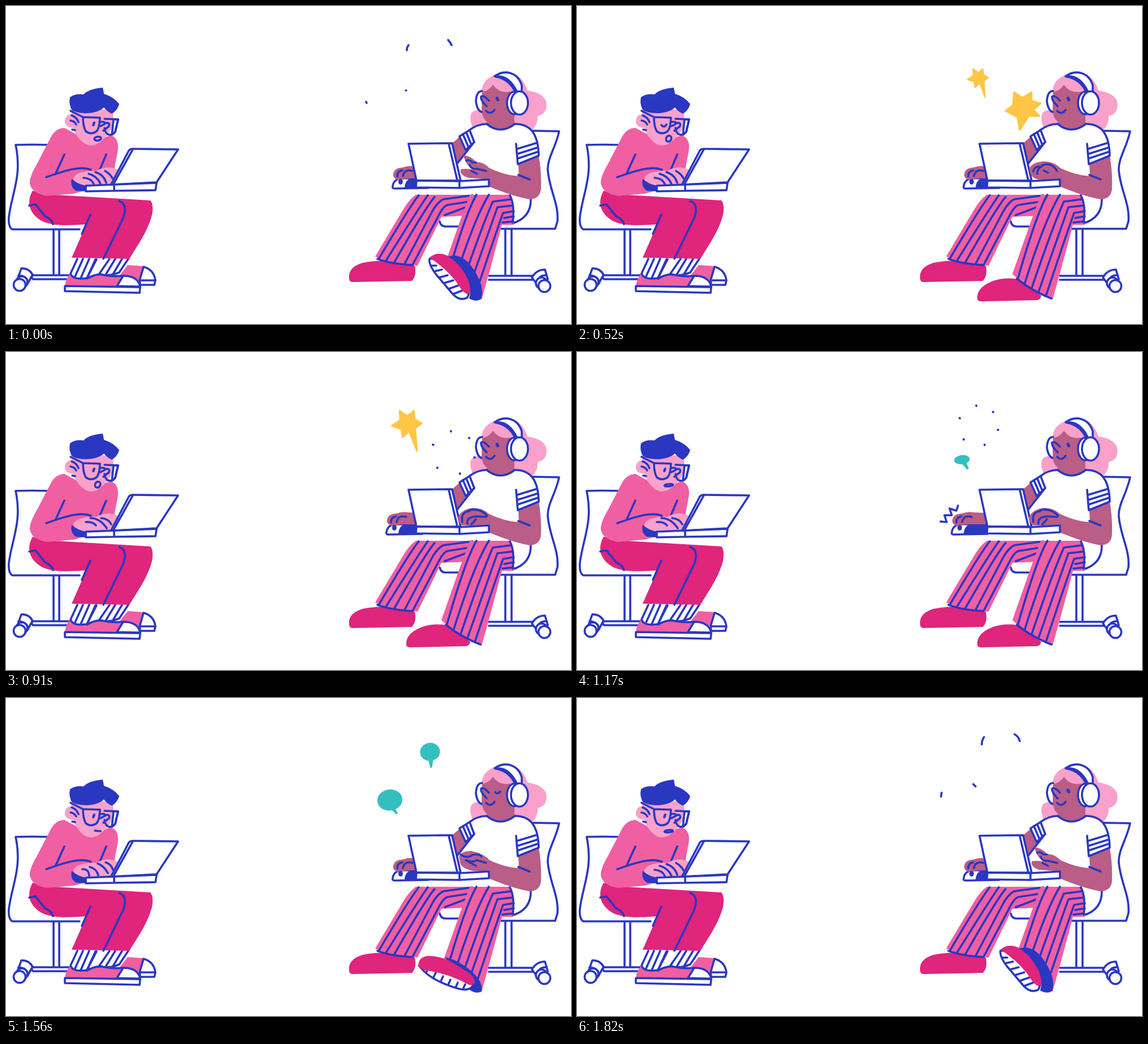
These frames come from a looping animation (998 px wide and 561 px high, 1.95 s). An HTML page:

```html
<!DOCTYPE html>
<html lang="en">
<head>
<meta charset="utf-8">
<title>Two people at laptops</title>
<style>
html, body { margin: 0; width: 100%; height: 100%; overflow: hidden; background: #fff; }
svg { display: block; width: 100%; height: 100%; stroke-linecap: round; stroke-linejoin: round; }
.line, .white { stroke: #2a37c1; stroke-width: 3.6; }
.line { fill: none; }
.white { fill: #fff; }
.blue { fill: #2a37c1; }
.pink { fill: #f05fa2; }
.pale { fill: #f9a1ca; }
.hot { fill: #df257c; }
.brown { fill: #ba5d87; }
.gold { fill: #ffc544; stroke: #ffc544; stroke-width: 3; }
.teal { fill: #34bfbe; }
</style>
</head>
<body>
<svg viewBox="0 0 998 561">
  <!-- left chair -->
  <path class="line" d="M75 245Q45 244 17 245C29 300 10 330 5 373Q4 390 11 394H130M84 395V473M94 395V473M113 475H48Q43 478 48 482H113"/>
  <path class="white" d="M20 483L27 463Q40 462 47 474L38 490Z"/>
  <path class="line" d="M22 475Q38 476 39 489"/>
  <circle class="white" cx="28" cy="487" r="10"/>
  <circle class="white" cx="24" cy="492" r="10.5"/>

  <!-- left legs and shoes -->
  <path class="pink" d="M200 476L215 457L243 459L237 484Z"/>
  <path class="white" d="M236 484L243 460Q261 465 264 484Z M236 484H264L262 492H237Z"/>
  <path class="white" d="M183 446L165 472Q178 479 200 470L216 446"/>
  <path class="line" d="M193 446L176 474M205 446L189 473"/>
  <path class="pink" d="M104 494Q106 479 114 472L145 481L165 473L208 476L198 495Z"/>
  <path class="white" d="M196 494L207 476Q233 476 237 495Z"/>
  <path class="white" d="M126 446L114 472Q118 484 143 480L160 447"/>
  <path class="line" d="M136 446L122 477M147 446L132 480M158 447L143 480M143 481Q158 472 170 474Q188 478 207 476"/>
  <path class="white" d="M104 494L237 496L236 506L104 503Z"/>
  <path class="hot" d="M47 326L85 333L255 343Q261 350 258 368C250 399 232 422 218 446L116 444L142 385C106 388 78 388 61 378C40 364 36 345 47 326Z"/>
  <path class="line" d="M41 352L52 350L69 371Q81 376 83 385M149 368L134 402M200 344C212 348 212 360 207 374L172 446"/>

  <!-- left body -->
  <path class="pink" d="M103 215Q88 216 80 230L54 280Q42 300 42 312Q44 330 72 335L120 331L195 310C186 290 198 265 198 247Q197 232 185 228L150 240Z"/>
  <path class="line" d="M103 262L88 295M71 302C95 294 130 280 150 289M177 262L166 288"/>
  <path class="pale" d="M114 180L189 183L190 207Q186 222 172 235Q152 255 134 239Q123 229 119 215Q104 214 104 203Q105 191 116 191Z"/>
  <path class="blue" d="M113 161Q123 154 137 156C144 148 158 145 171 144L173 155Q190 160 200 173Q197 184 187 190Q178 186 173 179C160 191 132 192 117 184Q110 174 113 161Z"/>
  <path class="white" d="M190 200H198L193 222Q190 226 187 227Z"/>
  <path class="line" d="M114 185L136 196L166 197Q165 216 160 221Q150 228 141 221Q136 213 136 196M174 199L198 200L193 221Q188 230 179 226Q174 221 174 215M165 206Q169 203 174 205M167 212L178 206Q184 206 182 212L172 220M116 193Q125 196 128 205M114 202Q121 203 124 209M117 218L122 219"/>
  <ellipse class="blue" cx="155" cy="208" rx="2.3" ry="4.5" transform="rotate(20 155 208)" data-on="0-3 5-14"/>
  <path class="line" d="M149 210Q154 216 158 209" data-on="4"/>
  <ellipse class="line" cx="162" cy="234" rx="6" ry="3.4" transform="rotate(-8 162 234)" data-on="0"/>
  <ellipse class="line" cx="162" cy="234" rx="4.5" ry="5.5" transform="rotate(30 162 234)" data-on="1-7"/>
  <ellipse class="line" cx="162" cy="235" rx="7.5" ry="2" transform="rotate(-4 162 235)" data-on="8-10 14"/>
  <path class="line" d="M157 234L167 235" data-on="11-13"/>
  <path class="pale" d="M119 304C123 292 148 290 160 291Q178 279 200 290L190 316L140 317Q121 316 119 304Z"/>
  <path class="blue" d="M116 305Q113 320 124 326L141 327V317Q126 314 116 305Z"/>
  <path class="line" d="M137 303Q151 304 155 314M146 296Q161 300 167 314M158 293Q173 298 177 312M175 291Q185 297 188 304" data-on="0-6 13 14"/>
  <path class="line" d="M141 300Q153 299 159 306M149 293Q166 293 178 311M168 293Q181 294 186 304" data-on="7-10"/>
  <path class="line" d="M135 302Q146 301 147 314M148 298Q160 301 163 313M162 292Q173 296 180 309M176 290Q186 293 189 303" data-on="11 12"/>
  <path class="white" d="M186 314L217 255Q219 252 224 252L304 253L266 311L191 315Z"/>
  <path class="line" d="M191 312L224 253"/>
  <path class="white" d="M141 317L191 315V326L141 327ZM191 315L266 312L264 325L191 326Z"/>

  <!-- right chair -->
  <path class="line" d="M925 220L977 221C971 250 956 268 957 290C960 325 977 350 974 380L970 393H862M766 380Q768 389 776 389H800M882 394V474M893 394V474M853 476H930M853 483H930"/>
  <path class="white" d="M929 479Q937 465 952 465L957 482L938 491Z"/>
  <path class="line" d="M938 490Q940 474 955 475"/>
  <circle class="white" cx="946" cy="489" r="10"/>
  <circle class="white" cx="951" cy="494" r="10.5"/>

  <!-- right body -->
  <path class="pale" d="M840 152Q840 128 870 119Q908 110 921 149Q948 153 954 168Q958 190 939 194Q940 208 930 218H826Q817 200 822 189Q828 182 842 184Z"/>
  <path fill="#fff" d="M850 208Q830 208 816 220L801 232L826 241L797 278L805 330L892 384Q928 372 927 340L941 263C940 222 925 208 898 208Z"/>
  <path class="line" d="M927 340Q928 374 893 384"/>
  <path class="brown" d="M801 231L787 243L796 279L814 254ZM905 279L941 264Q946 292 945 322Q944 340 925 341Q895 336 850 317V284Q880 299 906 300Z"/>
  <path class="white" d="M850 208Q832 208 817 220L801 230L812 254L827 240"/>
  <path class="line" d="M807 226L817 249M813 223L822 245M819 219L827 240L797 278M905 298L925 306"/>
  <path class="white" d="M898 208C925 208 940 223 941 264L904 279L901 243"/>
  <path class="line" d="M903 252L936 242M903 261L938 250M904 269L940 257"/>
  <path class="brown" d="M840 152Q853 150 860 139Q872 155 890 151L898 190V209Q873 228 850 209Q851 205 847 202Q840 195 840 180Z"/>
  <path class="line" d="M849 208Q873 228 899 208"/>
  <path class="white" d="M841 150Q831 150 830 168Q832 184 840 187"/>
  <path class="brown" d="M840 160Q848 158 852 166V180L840 172Z"/>
  <path class="line" d="M853 167Q843 156 839 160Q838 166 849 177M848 185Q856 193 863 183"/>
  <ellipse class="blue" cx="868" cy="164" rx="2.7" ry="4.5" transform="rotate(-25 868 164)" data-on="0-11 13 14"/>
  <path class="line" d="M864 166Q868 171 873 165" data-on="12"/>
  <path class="white" d="M863 124C881 111 904 117 911 140V151L901 152C894 136 880 126 863 124Z"/>
  <path class="blue" d="M863 123Q888 118 904 150L898 153Q888 130 863 126Z"/>
  <ellipse class="white" cx="898" cy="171" rx="13" ry="20"/>
  <ellipse class="white" cx="907" cy="171" rx="15" ry="20.5"/>

  <!-- right legs and shoes -->
  <path class="pink" d="M724 333Q712 341 701 360L652 442Q685 456 727 458L769 372L812 370L830 333Z"/>
  <path class="line" d="M729 334Q713 354 659 445M745 334Q730 355 672 448M757 337Q742 354 686 452M824 334L772 341Q761 347 752 364L704 455M819 345L780 351Q773 353 766 366L718 457M812 355L775 369"/>
  <path class="pink" d="M819 333L800 385L769 473Q800 502 840 518Q858 455 876 386H897Q899 350 891 333Z"/>
  <path class="line" d="M831 333Q812 365 779 480M853 333Q827 375 791 489M892 341L860 345Q840 390 803 498M895 352L868 355Q850 405 815 505M897 362L878 365Q862 410 828 512M897 371L880 374M896 380L877 382M890 334Q899 350 895 382"/>
  <path class="hot" d="M606 480Q604 461 630 453Q655 448 672 450L722 458Q726 475 717 485L612 487Q606 487 606 480Z"/>
  <path class="line" d="M656 446Q680 455 718 457"/>
  <g data-on="0 1 13 14">
    <path class="white" d="M748 446Q746 456 760 474L789 508Q801 521 814 515Q821 508 812 492L775 445Z"/>
    <path class="line" d="M751 458H760M757 468L770 465M765 479L780 475M773 489L790 484M782 499L799 493M790 508L806 502"/>
    <path class="hot" d="M748 444Q762 431 783 442C804 454 824 486 820 504Q815 514 803 498Q785 468 748 444Z"/>
    <path class="blue" d="M781 442Q805 434 825 463Q847 496 839 517Q831 523 818 516Q826 492 805 464Q795 450 781 442Z"/>
  </g>
  <g data-on="2 12">
    <path class="blue" d="M775 457Q806 464 831 491Q843 506 840 518Q829 523 818 514Z"/>
    <path class="white" d="M731 474Q750 499 800 513Q820 518 826 505L780 480Z"/>
    <path class="line" d="M742 485L745 478M755 493L759 485M768 500L772 491M781 506L785 497M794 511L798 502M807 514L811 505"/>
    <path class="hot" d="M728 474Q728 457 745 455Q766 455 784 464L818 485Q827 492 828 500Q826 511 814 504Q778 485 738 480Z"/>
  </g>
  <g data-on="3-11">
    <path class="hot" d="M707 516Q706 496 735 485Q757 478 778 482L820 511Q818 520 810 519L714 521Q707 521 707 516Z"/>
    <path class="line" d="M777 481Q802 502 838 516"/>
  </g>

  <!-- right hands and laptop -->
  <g id="mouse">
    <path class="white" d="M683 318Q685 304 701 304H746V321L686 322Q682 322 683 318Z"/>
    <path class="blue" d="M704 322Q704 305 720 303H746V322Z"/>
    <path class="brown" d="M684 300Q683 286 700 285Q711 281 722 283L746 284V304H713Q705 304 696 308Q686 306 684 300Z"/>
    <path class="line" d="M691 301Q691 291 700 290M701 300Q704 287 718 291"/>
    <ellipse class="blue" cx="697" cy="310" rx="4" ry="5"/>
  </g>
  <path class="line" d="M642 299L653 300L649 288L662 288L658 276L670 280L673 271" data-on="9"/>
  <path class="white" d="M711 243L788 242L803 308H725Z"/>
  <path class="line" d="M782 243L797 307"/>
  <g data-on="0 1 13 14">
    <path class="brown" d="M808 263Q822 265 830 275Q848 276 856 290V306L816 303Q801 298 803 288Q815 286 826 289Q812 282 808 263Z"/>
    <path class="line" d="M813 273Q818 270 824 276L830 276M819 280Q822 289 831 287L848 291M822 291L832 296"/>
  </g>
  <g data-on="2 3 11 12">
    <path class="brown" d="M800 279Q806 269 822 270Q844 274 856 288V306L824 305Q802 299 802 290Z"/>
    <path class="line" d="M803 276Q814 284 824 277Q836 274 840 280M812 286Q823 291 832 286L848 291M817 289L830 296"/>
  </g>
  <g data-on="4 5">
    <path class="brown" d="M799 287Q803 276 824 274Q846 275 856 289V306H815Q800 303 799 287Z"/>
    <path class="line" d="M806 292Q808 281 820 284M813 296Q812 287 824 280Q840 276 848 291M824 290L832 294"/>
  </g>
  <g data-on="6-10">
    <path class="brown" d="M798 292Q804 278 824 275Q846 275 856 290V306H806Q799 302 798 292Z"/>
    <path class="line" d="M806 300Q803 282 818 281M815 303Q813 291 831 290L848 291M818 279Q838 275 850 289M822 304L830 295"/>
  </g>
  <path class="white" d="M725 308L801 309V321L724 320ZM801 309L853 306V318L801 321Z"/>

  <!-- floating symbols -->
  <path id="starA" class="gold" d="M-15-30L0-20L16-30L16-15L32-10L19 1L30 12L11 12L-5 37L-9 14L-30 3L-17-7Z"/>
  <path id="starB" class="gold" d="M-13-23L0-14L11-23L12-9L24-2L13 6L16 44L3 11L-8 21L-10 8L-26 2L-12-7Z"/>
  <path id="bubbleA" class="teal"/>
  <path id="bubbleB" class="teal"/>
  <path id="bursts" class="line"/>
</svg>
<script>
const STEP = 130, STEPS = 15;
const el = id => document.getElementById(id);

const inSteps = (spec, n) => spec.split(' ').some(part => {
  const [from, to = from] = part.split('-').map(Number);
  return n >= from && n <= to;
});

function place(id, x, y, scale = 0) {
  el(id).setAttribute('transform', `translate(${x} ${y}) scale(${scale})`);
}

function bubble(id, shape) {
  if (!shape) return el(id).setAttribute('d', '');
  const [x, y, rx, ry, tipX, tipY] = shape;
  const rootX = x + (tipX - x) * .3, rootY = y + ry * .75;
  el(id).setAttribute('d',
    `M${x - rx} ${y}a${rx} ${ry} -8 1 1 ${2 * rx} 0a${rx} ${ry} -8 1 1 ${-2 * rx} 0` +
    `M${rootX + 5} ${rootY}L${tipX + 2} ${tipY - 2}Q${tipX} ${tipY + 2} ${tipX - 2} ${tipY - 1}L${rootX - 4} ${rootY}Z`);
}

// Six short rays around a point
function burst(x, y, inner, outer) {
  return [-96, -43, 12, 72, 137, 202].map(deg => {
    const c = Math.cos(deg * Math.PI / 180), s = Math.sin(deg * Math.PI / 180);
    return `M${x + inner * c} ${y + inner * s}L${x + outer * c} ${y + outer * s}`;
  }).join('');
}

const starSizeA = { 2: .52, 3: .78, 4: 1, 5: 1.08 };
const starSizeB = { 3: .35, 4: .74, 5: .9, 6: 1, 7: 1.05 };
const bubblesA = {
  9: [680, 190, 13.5, 8, 690, 207], 10: [679, 186, 18, 13, 690, 206],
  11: [678, 182, 21, 17, 690, 205], 12: [678, 180, 22, 18.5, 690, 205]
};
const bubblesB = {
  11: [750, 100, 11, 10, 751, 121], 12: [749, 95, 17.5, 16, 751, 123], 13: [749, 93, 23, 21, 752, 125]
};
const rays = {
  6: burst(790, 178, 28, 35.5),
  7: burst(790, 178, 38, 39),
  8: burst(709, 130, 28, 35),
  9: burst(709, 130, 35, 36),
  13: 'M650 165Q647 171 648 179M694 158L702 165',
  14: 'M644 167L643 174M700 152L704 156M719 69Q715 74 715 82M773 64Q780 68 782 76',
  0: 'M636 169L637 171M706 149L707 149M711 69Q708 73 708 78M781 60Q785 64 787 69'
};
const mouseShift = { 6: -5, 7: -11, 8: -17, 9: -21, 10: -13, 11: -5 };
const toggled = [...document.querySelectorAll('[data-on]')];

function draw(n) {
  for (const node of toggled) node.style.display = inSteps(node.dataset.on, n) ? '' : 'none';
  place('mouse', mouseShift[n] || 0, 0, 1);
  place('starA', 787, 182, starSizeA[n]);
  place('starB', 709, 128, starSizeB[n]);
  bubble('bubbleA', bubblesA[n]);
  bubble('bubbleB', bubblesB[n]);
  el('bursts').setAttribute('d', rays[n] || '');
}

const start = performance.now();
function tick() {
  draw(Math.floor((performance.now() - start) / STEP) % STEPS);
  requestAnimationFrame(tick);
}
tick();
</script>
</body>
</html>
```
